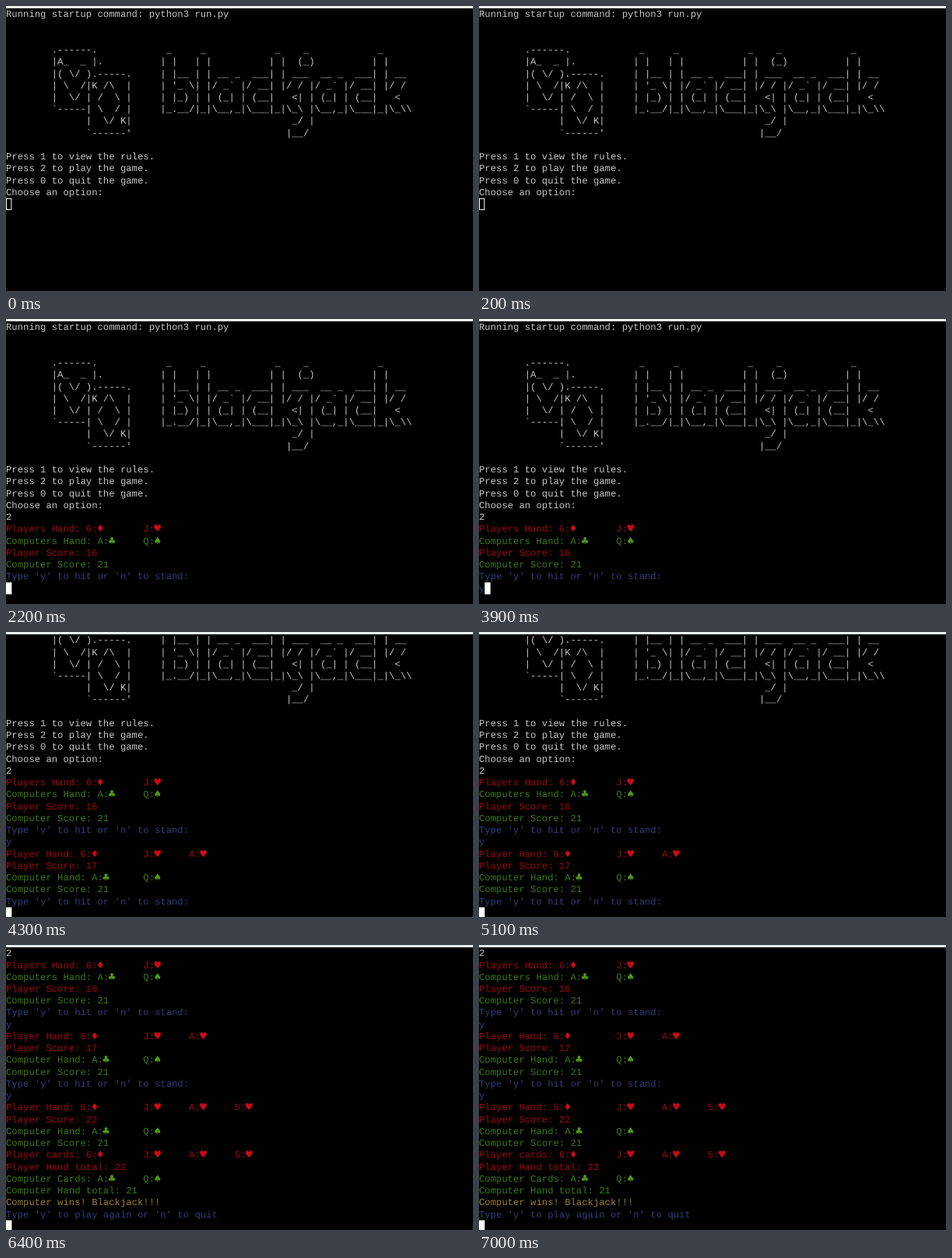
Animation of 600 by 366 pixels, one loop 8000 ms. Source, as an HTML page:

```html
<!DOCTYPE html>
<html lang="en">
<head>
<meta charset="utf-8">
<title>Terminal blackjack</title>
<style>
  html, body { margin: 0; width: 100%; height: 100%; overflow: hidden; background: #000; }
  svg { display: block; width: 100%; height: 100%; }
  text {
    font: 12.24px "Liberation Mono", "Courier New", monospace;
    white-space: pre;
    text-rendering: geometricPrecision;
    fill-opacity: 0.78;
  }
  .suit { font-family: "DejaVu Sans", sans-serif; fill-opacity: 1; }
</style>
</head>
<body>
<svg id="stage" viewBox="0 0 600 366">
  <rect width="600" height="366" fill="#000"/>
  <g id="screen"></g>
  <rect id="cursor"/>
  <rect width="600" height="3" fill="#f0f8f5"/>
</svg>
<script>
const SVG = "http://www.w3.org/2000/svg";
const LOOP = 8000;
const CELL_W = 7.345, CELL_H = 15.24, TOP = 3, BASELINE = 11.3, ROWS = 24;
const SUIT_SHIFT = -1.8; // centres the wider suit glyphs in their cells
const WHITE = "#fff", RED = "#cc0a18", GREEN = "#4e9a18", BLUE = "#3c5098", YELLOW = "#c4a63c";

// "~" stands for a backtick
const logo = String.raw`
.------.            _     _            _    _            _
|A_  _ |.          | |   | |          | |  (_)          | |
|( \/ ).-----.     | |__ | | __ _  ___| | ___  __ _  ___| | __
| \  /|K /\  |     | '_ \| |/ _~ |/ __| |/ / |/ _~ |/ __| |/ /
|  \/ | /  \ |     | |_) | | (_| | (__|   <| | (_| | (__|   <
~-----| \  / |     |_.__/|_|\__,_|\___|_|\_\ |\__,_|\___|_|\_\\
      |  \/ K|                            _/ |
      ~------'                           |__/
`.replaceAll("~", "`").split("\n").slice(1, -1).map(s => " ".repeat(8) + s);

const white = s => [s, WHITE];
const red = s => [s, RED];
const green = s => [s, GREEN];
const blue = s => [s, BLUE];

const drawn = ["6:♦", "J:♥", "A:♥", "5:♥"];
const playerCards = n => drawn.slice(0, n).join("\t");
const computerCards = "A:♣\tQ:♠";
const ask = blue("Type 'y' to hit or 'n' to stand:");

const round = (n, score) => [
  red("Player Hand: " + playerCards(n)),
  red("Player Score: " + score),
  green("Computer Hand: " + computerCards),
  green("Computer Score: 21")
];

const lines = [
  white("Running startup command: python3 run.py"),
  white(""), white(""),
  ...logo.map(white),
  white(""),
  white("Press 1 to view the rules."),
  white("Press 2 to play the game."),
  white("Press 0 to quit the game."),
  white("Choose an option:"),
  white("2"),
  red("Players Hand: " + playerCards(2)),
  green("Computers Hand: " + computerCards),
  red("Player Score: 16"),
  green("Computer Score: 21"),
  ask,
  blue("y"),
  ...round(3, 17),
  ask,
  blue("y"),
  ...round(4, 22),
  red("Player cards: " + playerCards(4)),
  red("Player Hand total: 22"),
  green("Computer Cards: " + computerCards),
  green("Computer Hand total: 21"),
  ["Computer wins! Blackjack!!!", YELLOW],
  blue("Type 'y' to play again or 'n' to quit")
];

// Cursor position over time; the screen scrolls to keep it in view
const steps = [
  { at: 0, row: 16, col: 0, hollow: true },
  { at: 1100, row: 16, col: 0 },
  { at: 2200, row: 22, col: 0 },
  { at: 3900, row: 22, col: 1 },
  { at: 4300, row: 28, col: 0 },
  { at: 6100, row: 28, col: 1 },
  { at: 6400, row: 39, col: 0 }
];

const screen = document.getElementById("screen");
const cursor = document.getElementById("cursor");

function set(el, attrs) {
  for (const key in attrs) el.setAttribute(key, attrs[key]);
}

function expandTabs(s) {
  return s.split("\t").reduce((out, part) => out.padEnd((Math.floor(out.length / 8) + 1) * 8) + part);
}

const isSuit = s => /[♦♥♣♠]/.test(s);

const rows = lines.map(([raw, fill], i) => {
  const el = document.createElementNS(SVG, "text");
  const s = expandTabs(raw);
  set(el, {
    fill,
    x: Array.from(s, (c, col) => (col * CELL_W + (isSuit(c) ? SUIT_SHIFT : 0)).toFixed(2)).join(" "),
    y: (TOP + i * CELL_H + BASELINE).toFixed(2)
  });
  for (const part of s.split(/([♦♥♣♠])/)) {
    const span = document.createElementNS(SVG, "tspan");
    span.textContent = part;
    if (isSuit(part)) set(span, { class: "suit" });
    el.append(span);
  }
  screen.append(el);
  return el;
});

function render(time) {
  const { row, col, hollow } = steps.findLast(s => s.at <= time);
  const scroll = Math.max(0, row - ROWS + 1);
  set(screen, { transform: `translate(0 ${-scroll * CELL_H})` });
  rows.forEach((el, i) => {
    const shown = i >= scroll && (i < row || (i === row && col > 0));
    set(el, { visibility: shown ? "visible" : "hidden" });
  });

  const inset = hollow ? 0.5 : 0;
  set(cursor, {
    x: col * CELL_W + inset,
    y: TOP + (row - scroll) * CELL_H + inset,
    width: CELL_W - 2 * inset,
    height: CELL_H - 2 * inset,
    fill: hollow ? "none" : WHITE,
    stroke: hollow ? WHITE : "none"
  });
}

const start = performance.now();
function tick() {
  render((performance.now() - start) % LOOP);
  requestAnimationFrame(tick);
}
tick();
</script>
</body>
</html>
```
